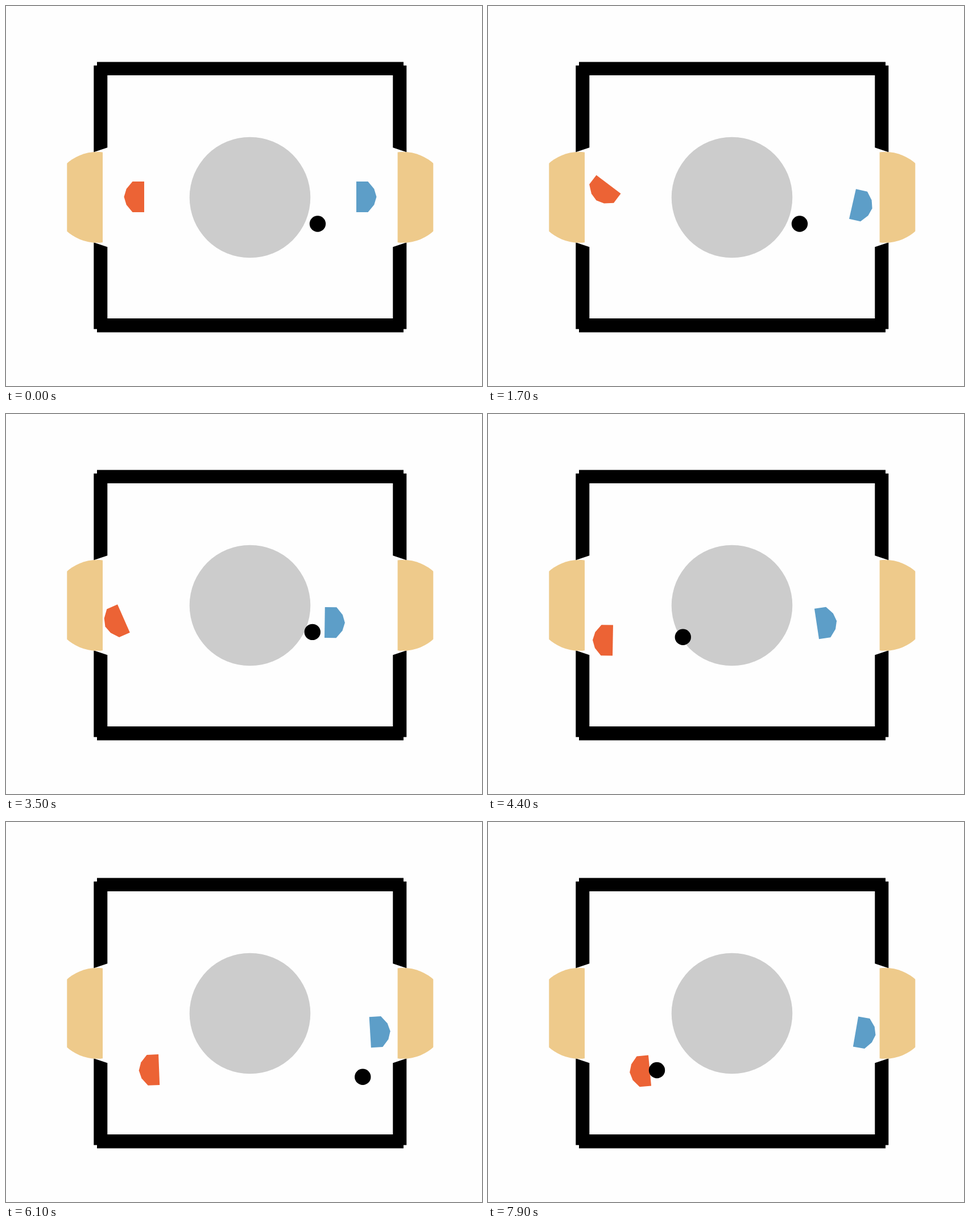
Animation, 837 px wide and 669 px high, one loop 8000 ms. Source, as an HTML page with a canvas:

```html
<!DOCTYPE html>
<html lang="en">
<head>
<meta charset="utf-8">
<title>Two-player table match</title>
<style>
  html, body { margin: 0; width: 100%; height: 100%; overflow: hidden; background: #fefefe; }
  canvas { display: block; }
</style>
</head>
<body>
<canvas id="stage" width="837" height="669"></canvas>
<script>
const ctx = document.getElementById('stage').getContext('2d');
const LOOP = 8000, STEP = 100;
const MID_X = 429.3, MID_Y = 336.8;

// Waypoints: time, x, y, turn in degrees; a player's x, y is the middle of its flat side.
const red = [
  [0, 243, 336, 0], [1250, 213, 309.5, -41], [1700, 212, 314, -52.7], [2600, 201.5, 323, -50.3],
  [4400, 219.5, 398.5, 1], [5400, 253.5, 420.7, -5.4], [6900, 282, 448.6, 1.5], [7900, 284.5, 437.5, -5.4]
];
const blue = [
  [0, 616, 336, 0], [1700, 641, 348.5, 12.8], [2600, 592.5, 359.7, 9.6], [3300, 561, 366, 3],
  [4400, 578, 369.5, -8.6], [5400, 630, 366, -8.7], [6900, 643.8, 375, 3.7], [7900, 646.5, 369, 9.8]
];
// The ball rests, is kicked by blue, then by red, and rebounds from the right wall.
const hits = [[0, 548, 383.5], [3460, 548, 383.5], [4861, 250, 397], [5920, 663, 450], [7900, 297, 437]];

function segment(keys, t) {
  let i = 0;
  while (i < keys.length - 2 && t >= keys[i + 1][0]) i++;
  return [i, (t - keys[i][0]) / (keys[i + 1][0] - keys[i][0])];
}

// Smooth curve through the waypoints, with each tangent taken from its neighbours.
function glide(keys, t) {
  const [i, u] = segment(keys, t);
  const a = keys[i], b = keys[i + 1];
  const slope = (k, n) => {
    const p = keys[Math.max(k - 1, 0)], q = keys[Math.min(k + 1, keys.length - 1)];
    return (q[n] - p[n]) / (q[0] - p[0]) * (b[0] - a[0]);
  };
  return [1, 2, 3].map(n => {
    const d = b[n] - a[n], m0 = slope(i, n), m1 = slope(i + 1, n);
    return a[n] + u * (m0 + u * (3 * d - 2 * m0 - m1 + u * (m0 + m1 - 2 * d)));
  });
}

// Straight runs between hits, slowing a little under drag.
function roll(t) {
  const [i, u] = segment(hits, t);
  const f = u + 0.08 * u * (1 - u);
  return [1, 2].map(n => hits[i][n] + (hits[i + 1][n] - hits[i][n]) * f);
}

function poly(color, points) {
  ctx.fillStyle = color;
  ctx.beginPath();
  points.forEach(p => ctx.lineTo(...p));
  ctx.fill();
}

function disc(color, x, y, r) {
  ctx.fillStyle = color;
  ctx.beginPath();
  ctx.arc(x, y, r, 0, 2 * Math.PI);
  ctx.fill();
}

// Draws once for every mirror image around the middle of the table.
function mirrored(sidesX, sidesY, paint) {
  for (const sx of sidesX) for (const sy of sidesY) {
    ctx.save();
    ctx.translate(MID_X, MID_Y);
    ctx.scale(sx, sy);
    paint();
    ctx.restore();
  }
}

function goal() {
  ctx.beginPath();
  ctx.rect(259.3, -90, 62.7, 180);
  ctx.clip();
  disc('#eeca8b', 269, 0, 80);
}

function field() {
  ctx.fillStyle = '#fefefe';
  ctx.fillRect(0, 0, 837, 669);
  ctx.fillStyle = '#000';
  ctx.fillRect(160, 98.5, 539, 23.5);
  ctx.fillRect(160, 550, 539, 24.5);
  mirrored([-1, 1], [-1, 1], () =>
    poly('#000', [[275, 232], [251, 232], [251, 87.5], [275, 79.5]]));
  mirrored([-1, 1], [1], goal);
  disc('#ccc', 429, 337, 106.3);
}

function player(color, keys, t, side) {
  const [x, y, turn] = glide(keys, t);
  ctx.save();
  ctx.translate(x, y);
  ctx.rotate(turn * Math.PI / 180);
  ctx.scale(side, 1);
  poly(color, [[0, -27], [20.5, -27], [31.3, -14], [35.5, 0], [31.3, 14], [20.5, 27], [0, 27]]);
  ctx.restore();
}

function draw(now) {
  const t = Math.floor(now % LOOP / STEP) * STEP;
  field();
  player('#ec6335', red, t, -1);
  player('#5d9ec8', blue, t, 1);
  disc('#000', ...roll(t), 14.2);
}

const start = performance.now();
function tick() {
  draw(performance.now() - start);
  requestAnimationFrame(tick);
}
tick();
</script>
</body>
</html>
```
